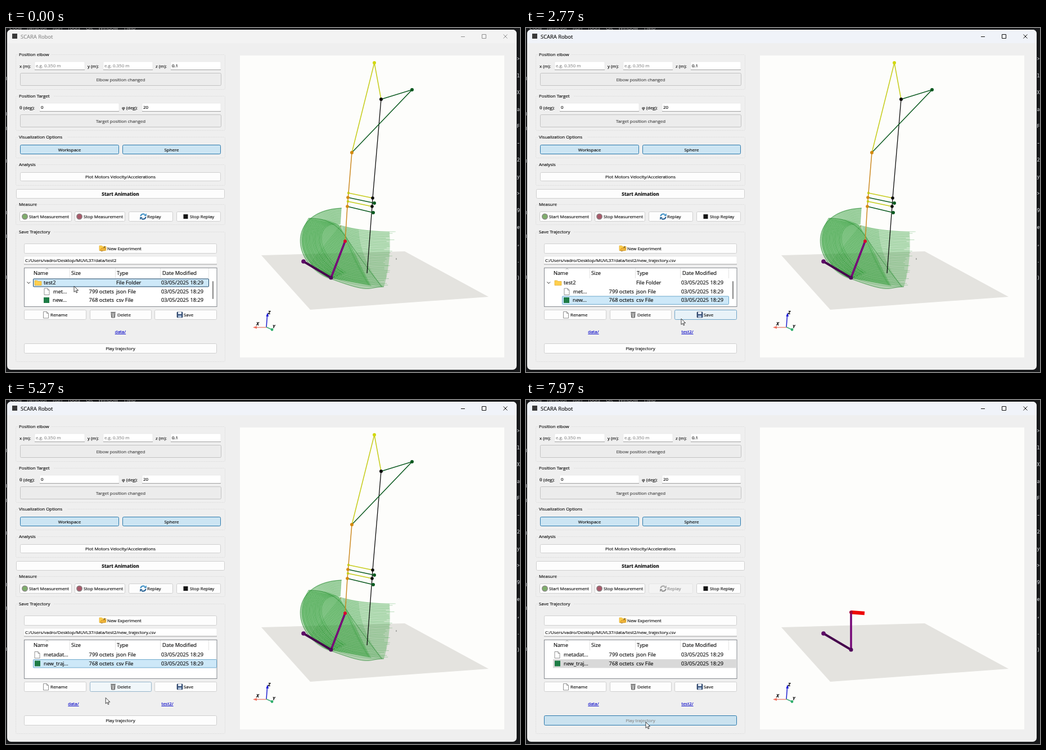
An HTML page that plays this animation: 914 px wide and 613 px high, repeating every 8000 ms.

```html
<!DOCTYPE html>
<html lang="en">
<head>
<meta charset="utf-8">
<title>SCARA Robot</title>
<style>
  html, body { margin: 0; width: 100%; height: 100%; overflow: hidden; background: #17181a; }
  svg { display: block; }
  text { --ink: #0c0c0c; font: 7.9px "Open Sans", "Noto Sans", sans-serif; fill: var(--ink); stroke: var(--ink); stroke-width: .16px; }
  .big { font-size: 9.25px; }
  .title { font-size: 9.4px; }
  .bold { font-size: 8.3px; font-weight: 700; }
  .axis { font-size: 8px; font-weight: 700; font-style: italic; }
  .mid { text-anchor: middle; }
  .end { text-anchor: end; }
  .grey { --ink: #8a8a8a; }
  .soft { --ink: #454545; }
  .link { --ink: #0000c8; text-decoration: underline; }
  .code { --ink: #c9ccd0; font: 8.5px "Noto Sans Mono", monospace; }
</style>
</head>
<body>
<svg id="stage" width="914" height="613" viewBox="0 0 914 613"></svg>
<script>
const LOOP = 8000, ACTIVE = 100, PICK = 1670, OPEN = 3200, PLAY = 6100, TRAIL = 6630;
const stage = document.getElementById('stage');

const text = (x, y, s, cls = '') => `<text x="${x}" y="${y}" class="${cls}">${s}</text>`;
const rect = (x, y, w, h, fill, stroke = 'none', r = 0, extra = '') =>
  `<rect x="${x}" y="${y}" width="${w}" height="${h}" fill="${fill}" stroke="${stroke}" rx="${r}" ${extra}/>`;
const path = (d, stroke, w = 1, fill = 'none', extra = '') =>
  `<path d="${d}" stroke="${stroke}" stroke-width="${w}" fill="${fill}" ${extra}/>`;
const dot = (x, y, r, fill) => `<circle cx="${x}" cy="${y}" r="${r}" fill="${fill}"/>`;
const mix = (a, b, k) => a + (b - a) * k;

let seed = 7;
const random = () => (seed = seed * 16807 % 2147483647) / 2147483647;

// ---- form widgets ----
function button(x, y, w, h, label, { fill = '#fdfdfd', stroke = '#cfcfcf', cls = '', at } = {}) {
  const base = y + h / 2 + 3;
  return rect(x + .5, y + .5, w - 1, h - 1, fill, stroke, 2) +
    (at ? text(at, base, label, cls) : text(x + w / 2, base, label, cls + ' mid'));
}
function field(x, y, w, h, value, cls = '') {
  return rect(x, y, w, h, '#fff', '#e2e2e2', 1.5, 'stroke-width=".6"') +
    path(`M${x} ${y + h}h${w}`, '#8c8c8c', .8) + text(x + 2, y + h / 2 + 3, value, cls);
}
function group(y, bottom, label) {
  return rect(17.5, y + .5, 372, bottom - y, 'none', '#dfdfdf', 2, 'stroke-dasharray="2 1"') +
    rect(21, y - 4, label.length * 4.1 + 2, 8, '#efefef') + text(23, y + 3, label);
}

// ---- icons ----
const page = (x, y) => path(`M${x} ${y - 5.5}h6l3 3v8.5h-9zM${x + 6} ${y - 5.5}v3h3`, '#777', .8, '#fff');
const sheetIcon = (x, y) => rect(x, y - 5, 10, 10, '#1d7c45');
const folder = (x, y) => path(`M${x} ${y - 4}h4.5l1.5 1.5h6v7h-12z`, '#d9a21b', .6, '#ffcf4d');
const swirl = (x, y, a, b) =>
  path(`M${x - 4.5} ${y - .5}a4.5 4.5 0 0 1 7.5 -3`, a, 2.2) +
  path(`M${x + 1} ${y - 1}h4.8v-4.8z`, 'none', 0, a) +
  path(`M${x + 4.5} ${y + .5}a4.5 4.5 0 0 1 -7.5 3`, b, 2.2) +
  path(`M${x - 1} ${y + 1}h-4.8v4.8z`, 'none', 0, b);
const bin = path('M187 508h7l-.7 8h-5.6zM186 506.5h9M189 509v6M192 509v6', '#555', 1, '#ddd');
const disk = rect(304, 506, 10, 10, '#35507a', '#22344f', 1, 'stroke-width=".6"') +
  rect(306, 506, 6, 4, '#e8eef6') + rect(306, 512, 6, 4, '#a9bdd8');

// ---- point cloud: dotted curves blended between two cubic edges ----
function cloud(a, b, n, opacity, rag = 0) {
  let d = '';
  for (let i = 0; i <= n; i++) {
    const p = a.map((v, k) => mix(v, b[k], i / n));
    p[6] += (random() - .5) * rag;
    d += `M${p[0]} ${p[1]}C${p.slice(2).map(v => v.toFixed(1)).join(' ')}`;
  }
  return path(d, '#0c8a18', 1, 'none', `opacity="${opacity}" stroke-dasharray="1.4 .7"`);
}
const stick = (p, color, w = 1.3) => path('M' + p.join(' '), color, w);
const YELLOW = '#c6cc1c', ORANGE = '#cc8a22', GREEN = '#0c5a20', BLACK = '#0a0a0a';

function workspace() {
  const outer = 'M597 321C500 325 505 420 578 447S640 462 672 461';
  const front = 'M538 339C516 375 524 418 574 445L650 460C632 430 616 385 592 351Q570 338 538 339Z';
  const wash = (d, opacity) => path(d, 'none', 0, '#2a9c30', `opacity="${opacity}"`);
  return wash(outer + 'C679 440 685 400 682 363Q630 361 594 351Z', .28) + wash(front, .32) +
    cloud([596, 321, 500, 325, 505, 420, 578, 447], [595, 349, 548, 344, 548, 400, 604, 436], 18, .5, 5) +
    cloud([540, 420, 575, 450, 630, 462, 671, 461], [594, 352, 620, 361, 650, 363, 685, 363], 34, .42, 18) +
    cloud([538, 339, 516, 375, 524, 418, 574, 445], [590, 350, 606, 375, 618, 415, 646, 458], 30, .55) +
    cloud([600, 354, 606, 390, 628, 432, 645, 458], [626, 359, 628, 395, 645, 435, 670, 461], 12, .35) +
    path(outer + 'M538 339Q582 338 604 372T668 461', '#157f20', .9, 'none', 'opacity=".7"');
}

function robot() {
  return workspace() +
    stick([694, 410, 694, 413], '#777', 1) + stick([595, 352, 595, 355], '#9a7a20', 1) +
    stick([667, 127, 652, 303, 651, 318, 642, 437], BLACK) +
    stick([615, 222, 607, 318, 603, 380], ORANGE, 1.5) +
    stick([615, 222, 655, 62, 667, 127], YELLOW, 1.5) +
    stick([667, 127, 722, 110, 615, 222], GREEN, 1.5) +
    stick([609, 294, 652, 303], YELLOW) + stick([608, 302, 655, 312], GREEN) +
    stick([608, 309, 651, 318], YELLOW) + stick([607, 318, 653, 329], GREEN, 1.5) +
    dot(655, 62, 3, '#d2d80e') + dot(667, 127, 3, BLACK) + dot(722, 110, 3, GREEN) +
    dot(615, 222, 3, '#d48a10') + dot(609, 294, 2.2, YELLOW) + dot(608, 309, 2.2, YELLOW) +
    dot(608, 302, 2.8, '#d48a10') + dot(607, 318, 2.8, '#d48a10') +
    dot(652, 303, 2.8, BLACK) + dot(651, 318, 2.8, BLACK) +
    dot(655, 312, 3, GREEN) + dot(653, 329, 3, GREEN);
}

function axes() {
  return path('M463 533L464.5 513', '#1c1cd0', 1.5) + path('M465 507l-2.5 7h4.6z', 'none', 0, '#1010d8') +
    path('M463 533.5H446', '#e8897c', 1.5) + path('M439 533.5l7 -2.5v5z', 'none', 0, '#f0705f') +
    path('M463 533l8 3.5', '#3fa978', 1.5) + dot(473, 537.5, 2.4, '#2fae6c') +
    text(445, 530, 'X', 'axis') + text(466, 510, 'Z', 'axis') + text(474, 535, 'Y', 'axis');
}

function backdrop() {
  const menu = { Code: 6, Refactor: 37, Run: 83, Tools: 109, Git: 142, Window: 164, Help: 210 };
  const edge = [...'>lXaF-2y>9e,.)'].map((c, i) => text(908.5, 58 + i * 30, c, 'code')).join('');
  const left = [87, 150, 176, 234, 326, 368, 441].map(y => rect(0, y, 1, 6, '#a9adb3')).join('');
  return rect(0, 0, 914, 613, '#17181a') +
    Object.entries(menu).map(([s, x]) => text(x, 3, s, 'title grey')).join('') + edge + left;
}

function form() {
  const pale = { fill: '#ececec', stroke: '#c2c2c2', cls: 'soft' };
  const on = { fill: '#cce5f3', stroke: '#2a78ab' };
  return group(47, 109, 'Position elbow') +
    text(24, 71, 'x (m):') + field(51, 60, 89, 14.5, 'e.g. 0.350 m', 'grey') +
    text(145, 71, 'y (m):') + field(173, 60, 88, 14.5, 'e.g. 0.350 m', 'grey') +
    text(266, 71, 'z (m):') + field(293, 60, 89, 14.5, '0.1') +
    button(25, 80, 358, 23, 'Elbow position changed', pale) +
    group(121, 182, 'Position Target') +
    text(24, 145, 'θ (deg):') + field(60, 134, 141, 14.5, '0') +
    text(206, 145, 'φ (deg):') + field(242, 134, 140, 14.5, '20') +
    button(25, 154, 358, 23, 'Target position changed', pale) +
    group(194, 231, 'Visualization Options') +
    button(25, 208, 176, 17, 'Workspace', on) + button(207, 208, 175, 17, 'Sphere', on) +
    group(243, 280, 'Analysis') + button(25, 257, 357, 16, 'Plot Motors Velocity/Accelerations') +
    button(18, 287, 371, 17, 'Start Animation', { cls: 'bold' }) +
    group(314, 350, 'Measure') +
    button(24, 327, 93, 18, 'Start Measurement', { at: 41 }) + dot(33.5, 336, 5.5, '#8b8b86') + dot(33.5, 336, 4, '#7fae6c') +
    button(122, 327, 90, 18, 'Stop Measurement', { at: 138 }) + dot(130.5, 336, 5.5, '#8b8484') + dot(130.5, 336, 4, '#a9596a') +
    button(303, 327, 79, 18, 'Stop Replay', { at: 327 }) + rect(315.5, 332, 8, 8, '#151515') +
    group(363, 594, 'Save Trajectory') +
    button(32, 384, 343, 18, 'New Experiment', { at: 180 }) + folder(166, 392) +
    path('M170 398l6 -9', '#70562a', 1.6) + path('M167 397l3 -5h8l-3 5z', '#b8801c', .6, '#f0b43c');
}

function frame() {
  return rect(416, 49, 470, 538, '#fdfdfb') +
    path('M454 405L709 398L858 479L541 502Z', 'none', 0, '#e4e3df') + axes();
}

stage.innerHTML = backdrop() + rect(2, 3, 906, 606, '#efefef', 'none', 7) +
  form() + frame() + `<g id="robot">${robot()}</g><g id="live"></g>`;
const robotLayer = document.getElementById('robot'), live = document.getElementById('live');

// ---- motion ----
const track = [
  [0, 121, 460], [1300, 107, 484], [1970, 107, 484], [2770, 276, 518], [3050, 287, 541],
  [3500, 287, 541], [4440, 140, 504], [4500, 138, 475], [4900, 138, 475],
  [5600, 210, 577], [5830, 212, 576], [6600, 212, 574], [8000, 213, 574]
];
function pointer(t) {
  t = Math.max(0, t);
  const i = track.findIndex((p, k) => k && t <= p[0]);
  const [t0, x0, y0] = track[i - 1], [t1, x1, y1] = track[i];
  const u = (t - t0) / (t1 - t0), k = u * u * (3 - 2 * u);
  return [mix(x0, x1, k), mix(y0, y1, k)];
}
const inside = ([px, py], x, y, w, h) => px >= x && px < x + w && py >= y && py < y + h;

// Hover tint averages the last 150 ms, which gives a soft fade.
function hoverButton(t, x, y, w, h, label, opts) {
  let k = 0;
  for (let i = 0; i < 6; i++) k += inside(pointer(t - i * 30), x, y, w, h) / 6;
  const tint = (a, b) => `rgb(${a.map((v, i) => Math.round(mix(v, b[i], k)))})`;
  return button(x, y, w, h, label, {
    fill: tint([253, 253, 253], [228, 240, 247]), stroke: tint([207, 207, 207], [90, 155, 197]), ...opts
  });
}

function titleBar(t) {
  const on = t >= ACTIVE, ink = on ? '#111' : '#8f8f8f';
  return path('M2 27V10a7 7 0 0 1 7 -7h892a7 7 0 0 1 7 7v17z', 'none', 0, on ? '#f0f3f9' : '#f3f3f3') +
    rect(11, 10, 9, 9, '#3a3a3a') + text(26, 18.5, 'SCARA Robot', on ? 'title' : 'title grey') +
    path('M809 15.5h7M846.5 11.5h7v7h-7zM884.5 11.5l7 7m0 -7l-7 7', ink, 1);
}

function row(y, indent, icon, name, size, type) {
  return icon(indent, y) + text(indent + 16, y + 3.3, name, 'big') + text(192, y + 3.3, size, 'big end') +
    text(196, y + 3.3, type, 'big') + text(276, y + 3.3, '03/05/2025 18:29', 'big');
}

function tree(t, at) {
  const opened = t >= OPEN, picked = t >= PICK;
  const box = opened ? [48, 462, 327, 15.5] : picked ? [64, 477.5, 297, 15.5] : [48, 446.5, 313, 15];
  const hot = inside(at, ...box);
  const sel = t >= PLAY ? rect(...box, '#d9d9d9')
    : rect(box[0] + .5, box[1] + .5, box[2] - 1, box[3] - 1, '#cde8f8', hot ? '#1d4566' : '#6fa9cc', 1);
  const rows = opened
    ? row(454, 51, page, 'metadat...', '799 octets', 'json File') +
      row(469.5, 51, sheetIcon, 'new_traj...', '768 octets', 'csv File')
    : path('M37.5 452.5l2.8 2.8l2.8 -2.8', '#222', 1) +
      row(454, 51, folder, 'test2', '', 'File Folder') +
      row(469.5, 68, page, 'met...', '799 octets', 'json File') +
      row(485, 67, sheetIcon, 'new...', '768 octets', 'csv File') +
      rect(367, 451, 2, 32, '#858585', 'none', 1);
  const heads = { Name: 49, Size: 116, Type: 197, 'Date Modified': 278 };
  return rect(32.5, 427.5, 342.5, 69, '#fff', '#868a90') +
    path('M113.5 428v18M194.5 428v18M274.5 428v18M360.5 428v18', '#e3e3e3', 1) +
    path('M70.5 430.5l2.5 -2l2.5 2', '#888', .7) +
    Object.entries(heads).map(([s, x]) => text(x, 440.3, s, 'big')).join('') + sel + rows;
}

function arm(t) {
  const playing = t >= PLAY;
  const x = !playing ? 603 : t < 6600 ? mix(603, 592, (t - PLAY) / 500) : mix(592, 578, Math.min(1, (t - 6600) / 1370));
  const y = mix(378.3, 380, (x - 578) / 25);
  return (t >= TRAIL ? stick([602, 380, x, y], '#ee0808', 6.5) : '') +
    stick([529, 416, 578, 445], '#45004c', 4) + stick([578, 445, x, y], '#760a78', 3.6) +
    dot(529, 416, 3.8, '#5c0a66') + dot(578, 445, 3.5, '#52085c') +
    dot(x, y, 3, t >= TRAIL ? '#a3083c' : '#d80a2c');
}

function draw(now) {
  const t = now % LOOP, at = pointer(t), playing = t >= PLAY, picked = t >= PICK;
  robotLayer.style.display = playing ? 'none' : '';
  live.innerHTML = titleBar(t) +
    button(218, 327, 79, 18, 'Replay', playing ? { at: 251, cls: 'grey', fill: '#f3f3f3', stroke: '#e4e4e4' } : { at: 251 }) +
    (playing ? swirl(244, 336, '#a9a9a9', '#8f8f8f') : swirl(244, 336, '#3e8fc4', '#245f92')) +
    field(32, 407, 343, 14, 'C:/Users/vadro/Desktop/MUVL37/data/test2' + (picked ? '/new_trajectory.csv' : '')) +
    tree(t, at) +
    hoverButton(t, 32, 502, 111, 18, 'Rename', { at: 79 }) + page(66.5, 511) +
    hoverButton(t, 149, 502, 110, 18, 'Delete', { at: 198 }) + bin +
    hoverButton(t, 264, 502, 111, 18, 'Save', { at: 316 }) + disk +
    text(picked ? 120 : 203.5, 544, 'data/', 'link mid') + (picked ? text(287, 544, 'test2/', 'link mid') : '') +
    hoverButton(t, 32, 562, 343, 18, 'Play trajectory',
      playing ? { fill: '#cae2ef', stroke: '#2a78ab', cls: 'grey' } : {}) +
    arm(t) +
    path(`M${at[0]} ${at[1]}v10.5l2.5 -2.3l1.7 3.8l1.6 -.7l-1.6 -3.7h3.4z`, '#111', .8, '#fff');
}

const start = performance.now();
function tick() {
  draw(performance.now() - start);
  requestAnimationFrame(tick);
}
tick();
</script>
</body>
</html>
```
